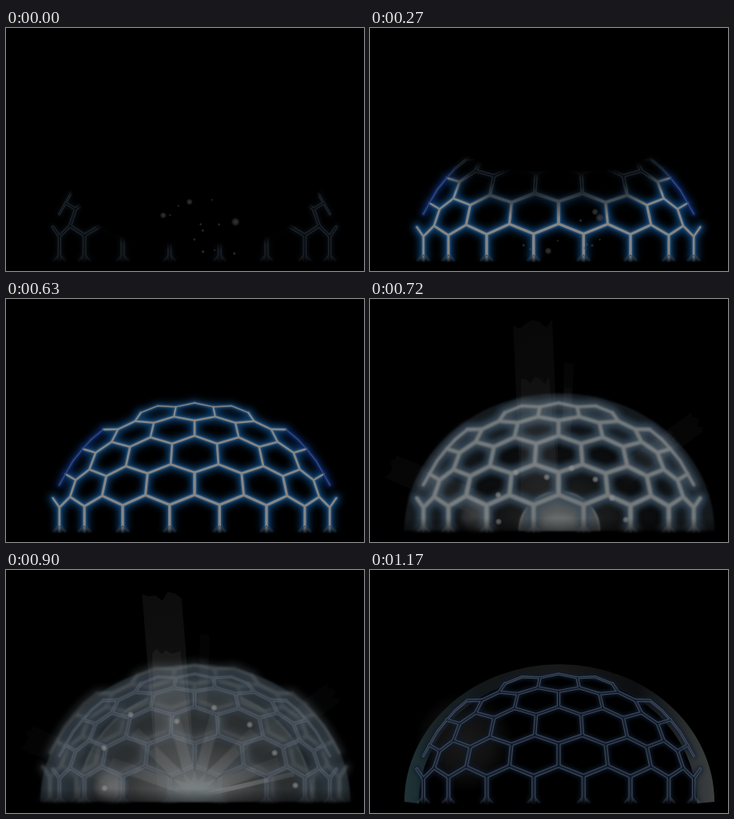
Write an HTML page with a canvas that moves like this. It is 448x304 px and loops after 1260 ms.

```html
<!DOCTYPE html>
<html lang="en">
<head>
<meta charset="utf-8">
<title>Energy dome</title>
<style>
html, body { margin: 0; width: 100%; height: 100%; overflow: hidden; background: #000; }
canvas { display: block; }
</style>
</head>
<body>
<canvas id="stage" width="448" height="304"></canvas>
<script>
const W = 448, H = 304, CX = 236, BASE = 290;
const STEP = 90, STEPS = 14, BURST = 8, REST = 13;
const ctx = document.getElementById('stage').getContext('2d');

const clamp = v => Math.max(0, Math.min(1, v));
const grey = (v, a) => `rgba(${v},${v},${v},${a})`;

function makeLayer() {
  const c = document.createElement('canvas');
  c.width = W;
  c.height = H;
  return c.getContext('2d');
}

function seeded(seed) {
  let s = seed * 7919 + 17;
  const next = () => (s = (s * 16807) % 2147483647) / 2147483647;
  next();
  return (lo = 0, hi = 1) => lo + (hi - lo) * next();
}

// Rings of a tilted sphere, one vertex every 10 degrees of longitude;
// even and odd vertices sit at different heights to form the zigzag.
const rings = [
  { even: 245, odd: 257.5, count: 9 },
  { even: 217, odd: 206.5, count: 9 },
  { even: 171, odd: 180.5, count: 8 },
  { even: 152, odd: 146.5, count: 7 },
  { even: 130, odd: 134, count: 4 }
];

function vertex(r, i) {
  const ring = rings[r];
  if (!ring || i >= ring.count) return null;
  const lon = i * Math.PI / 18;
  const radius = 180 - 7 * r - 1.1 * r * r;
  const sag = (5 + 14 * r) * (1 - Math.cos(lon));
  return [CX - radius * Math.sin(lon), (i % 2 ? ring.odd : ring.even) + sag];
}

function buildSegments() {
  const half = [];
  const add = (a, b, foot = false) => a && b && half.push({ a, b, foot });
  rings.forEach((ring, r) => {
    for (let i = 0; i < ring.count; i++) {
      const p = vertex(r, i);
      add(p, vertex(r, i + 1));
      if (i < 8 && i % 2 === r % 2) add(p, vertex(r + 1, i));
      if (r === 0 && i % 2) {
        add(p, [p[0], 291]);
        for (const side of [-7, 7]) add([p[0], 284], [p[0] + side, 291], true);
      }
    }
  });
  const flip = p => [2 * CX - p[0], p[1]];
  const all = half.concat(half.map(s => ({ ...s, a: flip(s.a), b: flip(s.b) })));
  for (const s of all) {
    const dx = (s.a[0] + s.b[0]) / 2 - CX, h = BASE - (s.a[1] + s.b[1]) / 2;
    s.rim = (dx / 185) ** 2 + (h / 160) ** 2 > 0.955;
    s.blue = s.rim && h < 122;
    s.w = s.foot ? 1 : s.rim ? 1.4 : 3.5 - h / 120 - Math.max(0, Math.abs(dx) - 110) / 90;
  }
  return all;
}
const segments = buildSegments();

function strokeAll(g, width, color, blur = 0) {
  const sheet = makeLayer();
  sheet.lineCap = 'round';
  for (const s of segments) {
    sheet.lineWidth = width(s);
    sheet.strokeStyle = typeof color === 'function' ? color(s) : color;
    sheet.beginPath();
    sheet.moveTo(...s.a);
    sheet.lineTo(...s.b);
    sheet.stroke();
  }
  g.filter = blur ? `blur(${blur}px)` : 'none';
  g.drawImage(sheet.canvas, 0, 0);
  g.filter = 'none';
}

function fadeBottom(g) {
  const fade = g.createLinearGradient(0, 284, 0, 294);
  fade.addColorStop(0, '#000');
  fade.addColorStop(1, 'transparent');
  g.globalCompositeOperation = 'destination-in';
  g.fillStyle = fade;
  g.fillRect(0, 0, W, H);
  g.globalCompositeOperation = 'source-over';
  return g.canvas;
}

function bakeNeon() {
  const g = makeLayer();
  strokeAll(g, s => s.foot ? 3 : s.rim ? 7 : 11, s => s.blue ? '#08245e' : '#0a3a68', 4.5);
  strokeAll(g, s => s.w + 2.2, s => s.blue ? '#10286a' : '#2b5074', 1.2);
  strokeAll(g, s => s.w, s => s.blue ? '#334c78' : s.foot ? '#3c4852' : '#868684', 0.4);
  return fadeBottom(g);
}

function bakeThin(color, glow) {
  const g = makeLayer();
  strokeAll(g, s => s.w + 1.8, color);
  g.globalCompositeOperation = 'destination-out';
  strokeAll(g, s => Math.max(0.4, s.w - 0.4), 'rgba(0,0,0,.8)');
  g.globalCompositeOperation = 'destination-over';
  strokeAll(g, s => s.w + 5, glow, 2.5);
  g.globalCompositeOperation = 'source-over';
  return fadeBottom(g);
}

function bakeSoft() {
  const g = makeLayer();
  strokeAll(g, () => 11, '#434d54', 4);
  strokeAll(g, s => s.w + 2.2, '#757b7d', 1);
  return fadeBottom(g);
}

const neon = bakeNeon();
const faint = bakeThin('#1f262c', '#080d12');
const steel = bakeThin('#455062', '#0f1c2f');
const soft = bakeSoft();
const mask = makeLayer(), temp = makeLayer();

function put(layer, alpha, scale = 1) {
  if (alpha <= 0) return;
  ctx.save();
  ctx.globalAlpha = alpha;
  ctx.translate(CX, BASE);
  ctx.scale(scale, scale);
  ctx.drawImage(layer, -CX, -BASE);
  ctx.restore();
}

// Reveals a layer from the ground up, with the flanks ahead of the middle.
function reveal(layer, front, ramp, alpha) {
  mask.setTransform(1, 0, 0, 1, 0, 0);
  mask.clearRect(0, 0, W, H);
  const grad = mask.createLinearGradient(0, -front, 0, ramp - front);
  grad.addColorStop(0, 'transparent');
  grad.addColorStop(1, '#000');
  mask.fillStyle = grad;
  for (let x = 0; x < W; x++) {
    const lead = 75 * ((x - CX) / 160) ** 4;
    mask.setTransform(1, 0, 0, 1, x, Math.round(BASE - lead));
    mask.fillRect(0, -600, 1, 1200);
  }
  temp.globalCompositeOperation = 'copy';
  temp.drawImage(layer, 0, 0);
  temp.globalCompositeOperation = 'destination-in';
  temp.drawImage(mask.canvas, 0, 0);
  put(temp.canvas, alpha);
}

function dot(x, y, r, v, a) {
  const g = ctx.createRadialGradient(x, y, 0, x, y, r);
  g.addColorStop(0, grey(v, a));
  g.addColorStop(0.55, grey(v, a * 0.65));
  g.addColorStop(1, grey(v, 0));
  ctx.fillStyle = g;
  ctx.fillRect(x - r, y - r, 2 * r, 2 * r);
}

// Three large embers and a handful of specks, thinning out as the dome closes.
function drawEmbers(n) {
  const rnd = seeded(n + 5);
  const left = clamp((7 - n) / 3);
  for (let i = 0; i < 3 * left; i++) {
    dot(rnd(175, 290), rnd(215, 282), rnd(4, 7), 80, 0.65);
  }
  for (let i = 0; i < 10 * left; i++) {
    dot(rnd(185, 293), rnd(214, 284), rnd(1.3, 2.4), 80, 0.6);
  }
}

// Fills a half ellipse with evenly spaced gradient colours from the centre out.
function dome(rx, ry, colors, alpha, rim) {
  if (alpha <= 0) return;
  ctx.save();
  ctx.globalAlpha = alpha;
  ctx.filter = 'blur(1.2px)';
  ctx.translate(CX + 1, BASE);
  ctx.scale(rx, ry);
  const g = ctx.createRadialGradient(0, 0, 0, 0, 0, 1);
  colors.forEach((c, i) => g.addColorStop(i / (colors.length - 1), c));
  ctx.fillStyle = g;
  ctx.beginPath();
  ctx.arc(0, 0, 1, Math.PI, 0);
  ctx.fill();
  if (rim) {
    ctx.strokeStyle = rim;
    ctx.lineWidth = 2 / rx;
    ctx.stroke();
  }
  ctx.restore();
}

// A shaft of light with a torn far end, a little denser in its inner part.
function ray(x0, y0, x1, y1, w, alpha) {
  const len = Math.hypot(x1 - x0, y1 - y0);
  const rnd = seeded(Math.round(len));
  ctx.save();
  ctx.translate(x0, y0);
  ctx.rotate(Math.atan2(y1 - y0, x1 - x0));
  for (const part of [1, 0.72]) {
    const reach = len * part;
    const g = ctx.createLinearGradient(0, 0, reach, 0);
    g.addColorStop(0, grey(165, 0));
    g.addColorStop(0.35, grey(165, alpha));
    g.addColorStop(1, grey(165, alpha * 0.7));
    ctx.fillStyle = g;
    ctx.beginPath();
    ctx.moveTo(0, -w / 2);
    for (let i = 0; i <= 6; i++) ctx.lineTo(reach - rnd(0, w / 4), (i / 6 - 0.5) * w * part);
    ctx.lineTo(0, w / 2);
    ctx.fill();
  }
  ctx.restore();
}

function drawRays(k, power) {
  const away = Math.abs(k - 1), drift = 4.5 * (k - 1);
  ray(214, 275, 199 - drift, 12 + 14 * away, 49, 0.13 * power);
  const side = 0.09 * clamp(1.5 - k / 2) * power;
  if (side <= 0) return;
  ray(245, 190, 249, 65 + 14 * away, 12, side);
  ray(150, 262, 22, 208, 32, side);
  ray(310, 225, 412, 152, 28, side);
}

// Light fan from the core, strongest two steps into the burst.
function drawFan(k) {
  const a = 0.14 * clamp(1 - Math.abs(k - 2.5) / 2);
  if (a <= 0) return;
  for (let i = 0; i < 6; i++) {
    const ang = Math.PI * (1.12 + i * 0.152);
    ray(CX, 278, CX + 115 * Math.cos(ang), 278 + 100 * Math.sin(ang), 15, a);
  }
  ray(CX + 8, 282, CX + 125, 255, 6, 2 * a);
}

function drawGlints(k) {
  const rnd = seeded(3);
  const a = clamp(1.2 - Math.abs(k - 1) * 0.45);
  for (let i = 0; i < 8; i++) {
    const ang = Math.PI * (1.05 + i * 0.128);
    const r = rnd(90, 118) * (0.8 + 0.2 * k);
    dot(CX + r * Math.cos(ang), BASE + r * 0.95 * Math.sin(ang), 4.5, 150, a);
  }
}

function drawCore(k, power) {
  const halo = 60 + 18 * k, r = 30 + 7 * k;
  dome(halo, halo * 0.8,
    [grey(130, power), grey(115, power * 0.8), grey(95, power * 0.4), grey(90, 0)], 0.9);
  dome(r, r * 0.72 + 4,
    ['rgba(125,136,138,.9)', 'rgba(122,134,137,.85)', 'rgba(115,128,132,.7)', 'rgba(105,115,118,0)'], power);
  dot(CX - 105, 271, 24, 140, 0.75 * power);
}

// Leftover shell: a band between two half ellipses, lit from the right.
function drawShell(alpha) {
  if (alpha <= 0) return;
  ctx.save();
  ctx.globalAlpha = alpha;
  const g = ctx.createLinearGradient(43, 0, 431, 0);
  ['#1f3337', '#121718', '#191919', '#0c0e0f', '#3c4041']
    .forEach((c, i) => g.addColorStop(i / 4, c));
  ctx.fillStyle = g;
  ctx.beginPath();
  ctx.ellipse(CX + 1, BASE, 194, 172, 0, Math.PI, 0);
  ctx.ellipse(CX - 1, BASE + 2, 174, 160, 0, 0, Math.PI, true);
  ctx.fill();
  dot(118, 215, 62, 28, 0.9);
  ctx.restore();
}

function shadeFloor(alpha) {
  const g = ctx.createLinearGradient(0, 274, 0, 293);
  g.addColorStop(0, 'transparent');
  g.addColorStop(1, `rgba(0,0,0,${alpha})`);
  ctx.fillStyle = g;
  ctx.fillRect(0, 274, W, 30);
}

function drawBurst(k) {
  const power = Math.min(1, 0.5 + k / 2) * (1 - 0.2 * Math.max(0, k - 1));
  dome(194, 172, ['#4a4c4c', '#404344', '#303334', '#1a1c1e', '#14181b', '#2f3a41', '#283239'], power);
  put(soft, 0.55 * power, 1 + 0.035 * k);
  drawShell((k - 2) / 3);
  const wave = 50 + 48 * k;
  dome(wave, wave * 0.97, ['#646868', '#5c6060', '#52585a'], 0.85 * clamp(1.35 - 0.45 * k), '#7c8182');
  put(neon, 0.7 * (1 - k));
  put(soft, clamp(1.25 - 0.35 * k));
  put(steel, clamp(0.35 * (k - 1)));
  drawCore(k, power);
  drawFan(k);
  drawRays(k, power);
  drawGlints(k);
  shadeFloor(0.6);
}

function draw(n) {
  ctx.fillStyle = '#000';
  ctx.fillRect(0, 0, W, H);
  if (n < BURST) {
    const front = 22 + 30 * n;
    reveal(faint, front, 10, 1);
    reveal(neon, front - 20, 40, clamp(n / 3));
    drawEmbers(n);
  } else if (n < REST) {
    drawBurst(n - BURST);
  } else {
    drawShell(1);
    put(steel, 0.9);
  }
}

let shown = -1;
const start = performance.now();
function tick() {
  const n = Math.floor((performance.now() - start) / STEP) % STEPS;
  if (n !== shown) draw(shown = n);
  requestAnimationFrame(tick);
}
tick();
</script>
</body>
</html>
```
